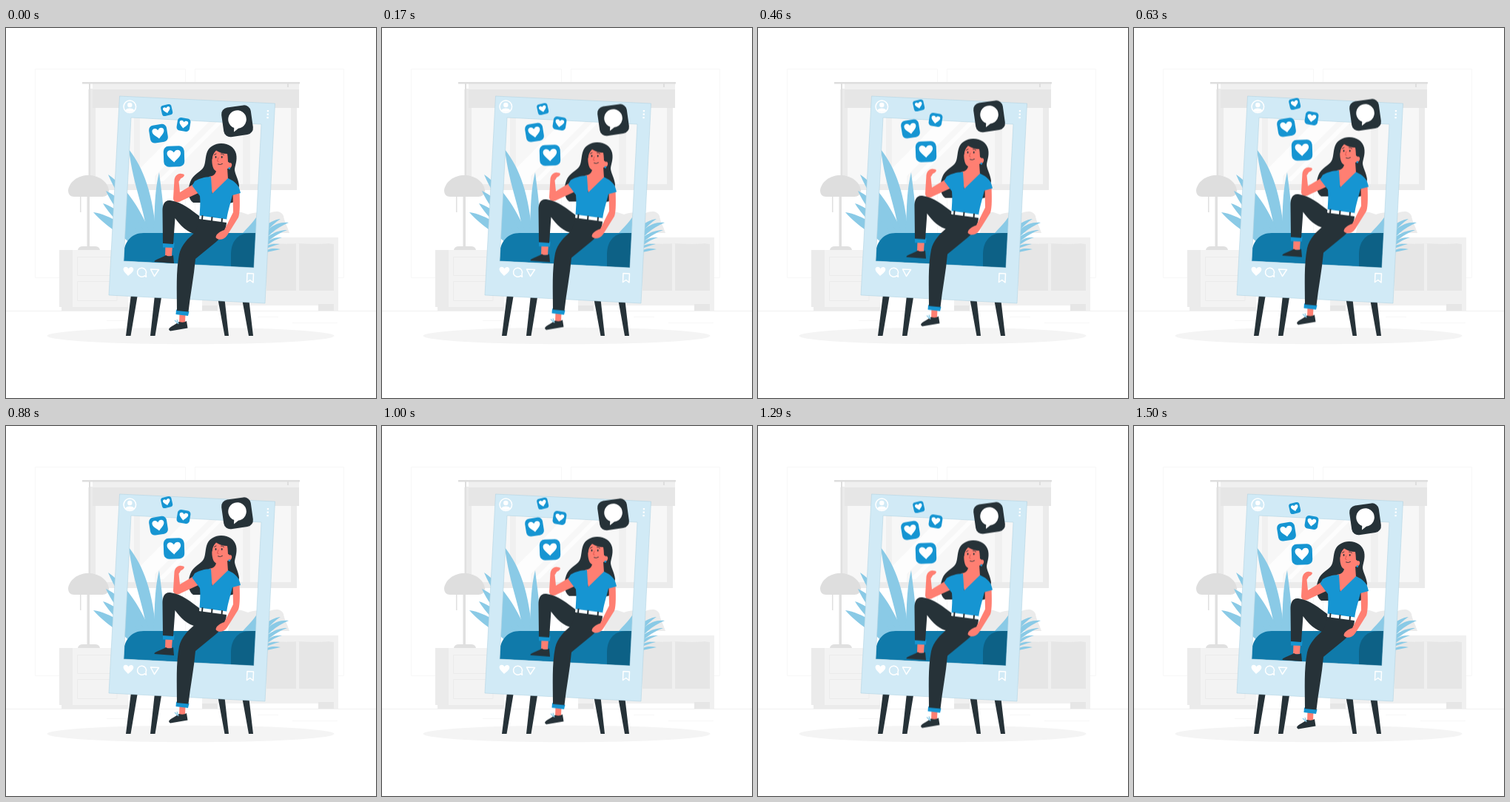
An HTML page that plays this animation: 500 by 500 pixels, repeating every 1540 ms.

```html
<!DOCTYPE html>
<html lang="en">
<head>
<meta charset="utf-8">
<title>Social photo frame</title>
<style>
html, body { margin: 0; width: 100%; height: 100%; overflow: hidden; background: #fff; }
svg { display: block; width: 100vw; height: 100vh; }
.ink { fill: #263238; }
.blue { fill: #1695d2; }
.skin { fill: #ff7f72; }
.leaf { fill: #8acae6; }
.white { fill: #fff; }
.line { fill: none; stroke: #fff; stroke-width: 1.5; stroke-linejoin: round; }
.face { fill: none; stroke: #263238; stroke-width: .9; stroke-linecap: round; }
</style>
</head>
<body>
<svg viewBox="0 0 500 500">
  <defs>
    <path id="heart" d="M0 8.5C-3 5-9.3 1-9.3-3.6C-9.3-8.4-3-9.8 0-4.7C3-9.8 9.3-8.4 9.3-3.6C9.3 1 3 5 0 8.5Z"/>
    <g id="like">
      <rect class="blue" x="-14" y="-14" width="28" height="28" rx="7"/>
      <use href="#heart" class="white" y="-.6"/>
    </g>
    <clipPath id="hole"><path d="M169 121L345 130L335 324L159 315Z"/></clipPath>
  </defs>

  <!-- room -->
  <g fill="none" stroke="#f7f7f7">
    <path d="M39.5 55.5H242.5V337.5H39.5ZM255.5 55.5H456.5V337.5H255.5Z"/>
    <path d="M0 382.5H500" stroke="#f0f0f0"/>
    <path d="M136 395.5H172M387 398.5H448M340 390.5H368"/>
  </g>
  <path fill="#ebebeb" d="M112 82H393V219H112Z"/>
  <path fill="#f7f7f7" d="M121 84H173V211H121ZM181 84H320V211H181ZM330 84H385V211H330Z"/>
  <path fill="#fff" d="M262 108H293L201 200V211H181V190ZM304 108H312L213 207H205Z" opacity=".8"/>
  <path fill="#f0f0f0" d="M173 108H181V211H173ZM320 108H330V211H320Z"/>
  <path fill="#e6e6e6" d="M117 82H396V108H117Z"/>
  <path fill="#f0f0f0" d="M117 75H396V83H117Z"/>
  <path fill="#dedede" d="M103 73H397V75.5H103ZM112 75H114V83H112ZM380 75H382V80H380Z"/>

  <!-- lamp and dresser -->
  <path fill="#e0e0e0" d="M111.5 83H114V200H111.5ZM109.500 228H113V297H109.500ZM100 228H101.500V249H100ZM97 300Q98 295 104 295H120Q126 295 127 300Z"/>
  <path fill="#dedede" d="M84 219C86 207 98 199 111 199C125 199 137 207 139 219C139 225 135 228 130 228H92C87 228 84 225 84 219Z"/>
  <path fill="#f3f3f3" d="M89 300H165V377H89Z"/>
  <path fill="#ebebeb" d="M72 300H90V377H72ZM75 377H165V382H75Z"/>
  <path fill="none" stroke="#ebebeb" d="M96.5 309.5H150V334.5H96.5ZM96.5 342.5H150V368.5H96.5Z"/>

  <!-- armchair -->
  <path fill="#ebebeb" d="M300 277C302 262 307 258 309 252C313 246 321 250 327 252C338 248 347 250 354 251C362 247 372 246 375 254C376 261 380 268 383 277Z"/>
  <path fill="#f0f0f0" d="M265 283H449V375H265Z"/>
  <path fill="#e6e6e6" d="M352 283H449V355H352ZM265 375H286V382H265ZM422 373H443V382H422Z"/>
  <path fill="#f0f0f0" d="M392 290H396V355H392ZM443 288H449V382H443ZM352 283H449V288Q444 294 437 291Q420 293 396 291Q374 293 352 290Z"/>
  <ellipse cx="249.5" cy="416" rx="194" ry="11.3" fill="#f4f4f4"/>

  <!-- plants -->
  <g class="leaf">
    <path d="M166 164C185 188 200 225 203 285H191C189 248 172 215 166 164Z"/>
    <path d="M207 195C210 222 215 245 213 290H197C203 262 198 232 207 195Z"/>
    <path d="M138 198C160 213 186 247 199 290H187C178 257 154 236 138 198Z"/>
    <path d="M135 220C158 231 180 256 194 290H182C172 267 149 251 135 220Z"/>
    <path d="M131 237C151 243 173 264 188 290H176C163 270 145 260 131 237Z"/>
    <path d="M118 249C141 252 166 270 181 292H168C157 278 136 270 118 249Z"/>
    <path d="M338 256C330 268 320 274 310 292H338Z"/>
    <path d="M371 258C354 260 341 274 333 298H339C348 279 357 267 371 258Z"/>
    <path d="M382 263C363 261 347 274 337 298H342C353 280 364 271 382 263Z"/>
    <path d="M380 273C364 273 349 282 341 298H345C354 287 364 279 380 273Z"/>
    <path d="M373 283C361 282 350 288 344 299H347C355 291 363 286 373 283Z"/>
    <path d="M370 292C359 291 351 293 346 301C355 296 362 294 370 292ZM371 299C362 297 353 298 347 304C356 302 363 301 371 299Z"/>
  </g>

  <!-- stand and frame -->
  <path class="ink" d="M169 360H178L168.500 416H162ZM201 361H210.500L201.500 416H195ZM286.500 367H295.500L301 416H295.500ZM319.500 369H328.500L334 416H328Z"/>
  <g clip-path="url(#hole)">
    <path fill="#107aaa" d="M150 330L159 303C161 288 170 277 186 277H340V330Z"/>
    <path fill="#0d6186" d="M304 330V306C304 289 313 277 330 277H342V330Z"/>
  </g>
  <path fill="#d1eaf6" fill-rule="evenodd" stroke="#b3d3e2" stroke-width=".6" d="M153.5 92L363.5 102L350 372L139 361ZM169 121L345 130L335 324L159 315Z"/>
  <circle class="line" cx="167.3" cy="106.3" r="8.3"/>
  <circle class="white" cx="167.3" cy="104" r="3.2"/>
  <path class="white" d="M161.3 111.5C162 107.5 172.5 107.5 173.3 111.5Q167.3 116 161.3 111.5Z"/>
  <path class="white" d="M352.8 111h2.3v2.3h-2.3zM352.6 115.5h2.3v2.3h-2.3zM352.4 120h2.3v2.3h-2.3z"/>
  <use href="#heart" class="white" transform="translate(165.3 328.7) rotate(3) scale(.74)"/>
  <path class="line" d="M187.3 334.8A6 6 0 1 1 189 332.5L189.500 336.300Z"/>
  <path class="line" d="M195.5 326L206.5 326.5L200.5 335.5Z"/>
  <path class="line" d="M326 331.5L334.5 332L334 344L329.8 340.5L325.5 343.5Z"/>

  <g id="float">
    <!-- icons -->
    <use href="#like" transform="translate(217.2 111) rotate(-13) scale(.52)"/>
    <use href="#like" transform="translate(240 130.5) rotate(9) scale(.63)"/>
    <use href="#like" transform="translate(206 142.7) rotate(-9) scale(.86)"/>
    <use href="#like" transform="translate(227 173.5) rotate(-2)"/>
    <g transform="translate(312.5 125.8) rotate(-8)">
      <rect class="ink" x="-20" y="-20" width="40" height="40" rx="9"/>
      <path class="white" d="M-5.500 8.500A12.300 12.300 0 1 1 0 10L-6.500 14Z"/>
    </g>

    <!-- hair behind -->
    <path class="ink" d="M290 156C300 155.500 309 161 311 170C313 180 309 186 309 192C310 199 314 204 315 213L312 230Q308 238 300 236L253 236C246 232 245 218 249 208C253 197 263 195 267 188C270 182 269 174 272 167C275 160 283 156 290 156Z"/>

    <!-- raised arm -->
    <path class="skin" d="M255 210L235 222L233.500 207.500C236 205 235 203 238 202.500C242 200 242 197 237 197C232 196 228.500 200 227.500 205L226 230C226 235 231 237 236 234L262 222Z"/>

    <!-- bent leg -->
    <path class="skin" d="M215.5 293H225L224 308L215 309Z"/>
    <path class="ink" d="M216 307Q221 310 226 307L227 318L200.5 316C200 313 208 312 216 307Z"/>
    <path class="blue" d="M212 290L227.5 290.5L227 297L212 296.5Z"/>
    <path class="ink" d="M264 256C250 246 238 235 222 233C214 232 211.5 239 211.5 247L212 291L226 292L228.500 257C235 266 245 277 258 279L285 268Z"/>

    <!-- straight leg -->
    <path class="skin" d="M234.5 385H242.5L242 399L234 400Z"/>
    <path class="ink" d="M234 397Q240 399 244 396L245.5 405.5L222 409.5C218 407 221 405 226 402Z"/>
    <path d="M228 395L232 399M231 394L233 400" fill="none" stroke="#8acae6" stroke-width="1.2"/>
    <path class="blue" d="M230 380.5L247.5 383L246 389L229.5 387Z"/>
    <path class="ink" d="M262 257L298 262C298 271 293 281 284 289L256 312C254 336 249 360 246.500 383.500L231 382C231 354 229.500 329 234 306C237 293 246 284 256 276Z"/>

    <!-- resting arm -->
    <path class="skin" d="M306.5 222L307 249L295 273C289 275 284 278 283.500 283C286 287 294 287.500 299 280L314 256C316.500 250 316 232 315.500 221Z"/>

    <!-- torso -->
    <path class="skin" d="M284.5 189H299L300 204L279 225L274 201C280 200 284.500 198 284.500 189Z"/>
    <path class="blue" d="M277 201C268 201 260 204 255 207L251.5 213L262 227C263 236 262 246 261.5 255L298 261C299 250 303 238 306 226L317 223C315 213 311 208 300 203L278.5 224Z"/>
    <path class="white" d="M261.5 253.5L298.5 258.5L298 263L261 258Z"/>
    <path class="ink" d="M264.5 253L266.5 253.3L266 259H264ZM277.5 255L279.5 255.3L279 261H277ZM291 257L293 257.3L292.5 263H290.5Z"/>

    <!-- head -->
    <path class="skin" d="M279.5 169C277.5 177 278 188 282 192C287 196.500 295 195 299 190C304 191 307 185 304 182L300 181L299 165L284 164Z"/>
    <path class="ink" d="M277 173C279 163 288 159 297 160C305 162 311 171 308.500 180C306 184 303.500 181.500 302 182.500C300 180 301 175 299 170C293 170 288 168 284 165.500Q279 170 278.500 178Z"/>
    <circle class="blue" cx="301.8" cy="189.7" r="1.4"/>
    <ellipse class="ink" cx="283.5" cy="174.500" rx=".9" ry="1.4"/>
    <ellipse class="ink" cx="291.700" cy="174.500" rx=".9" ry="1.4"/>
    <path class="face" d="M281.5 171.300L284 170M290.500 170Q293 169.500 294.500 171.500M286.500 184Q289.500 185.500 292.500 183.500"/>
    <path d="M287 175L285.500 180L287.500 180.500" fill="none" stroke="#d84f4b" stroke-width=".8"/>
  </g>
</svg>
<script>
const rise = 8.8, loop = 1540, lead = 40;
const ease = "cubic-bezier(.3642, 0, .6358, 1)";
const at = y => ({ transform: `translate(0px, ${y}px)`, easing: ease });
document.getElementById("float").animate([at(0), at(-rise), at(0)],
  { duration: loop, delay: -lead, iterations: Infinity });
</script>
</body>
</html>
```
